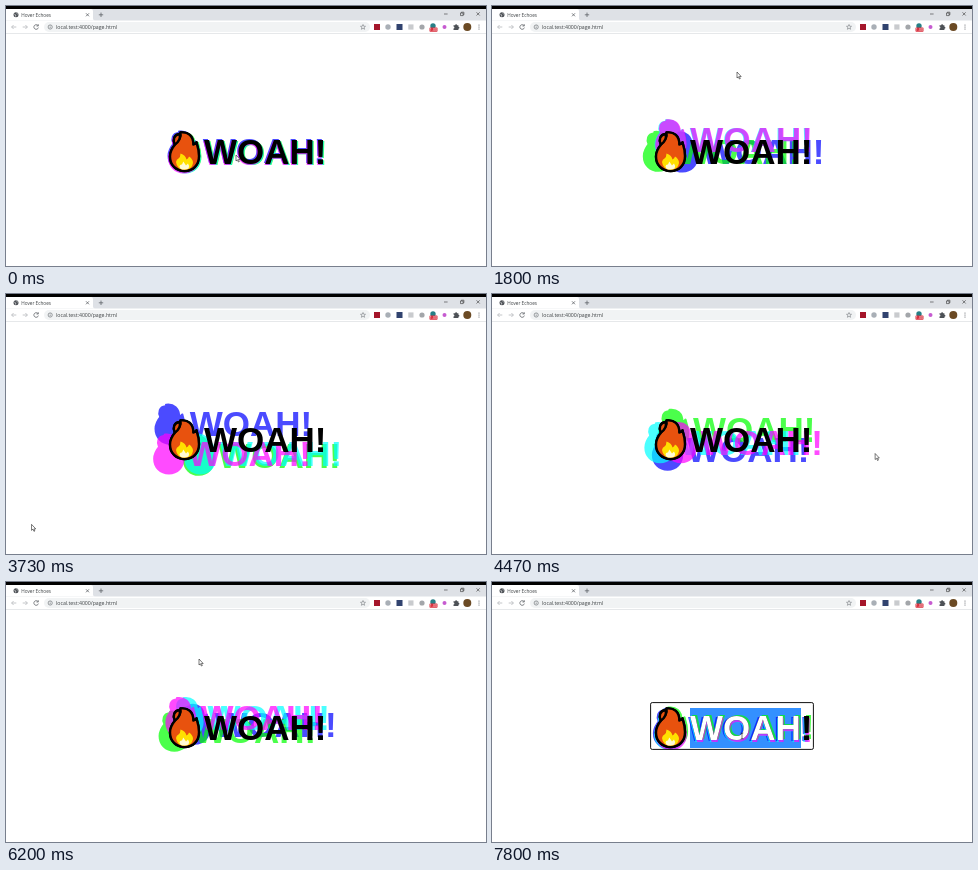
An HTML page for the animation above (8000 ms loop, 480 by 260 pixels).

```html
<!DOCTYPE html>
<html lang="en">
<head>
<meta charset="utf-8">
<title>Hover Echoes</title>
<style>
html, body { margin: 0; width: 100%; height: 100%; overflow: hidden; background: #fff; }
svg { display: block; width: 100vw; height: 100vh; }
.ui { font-family: "Open Sans", "Noto Sans", sans-serif; fill: #3c4043; }
.word { font: bold 35px "Liberation Sans", Arial, sans-serif; }
.line { fill: none; stroke: #5f6368; stroke-width: .8; }
</style>
</head>
<body>
<svg viewBox="0 0 480 260">
  <defs>
    <path id="body" d="M174.5 126.5C182 125.5 187.5 130 187.3 138.5Q189.5 138 190.5 136.3C192 141 193 146 193 150C193 159 187 165 178.6 165C170 165 164 159 164 150.5C164 145 166.5 141.5 169.5 138C173 134 175.5 131 174.5 126.5Z"/>
    <path id="drop" d="M168.8 138.5C166.5 134 168 128.5 173.6 128C174.6 132 173.5 135.5 168.8 138.5Z"/>
    <g id="shape">
      <g stroke-width="2.4" stroke-linejoin="round"><use href="#body"/><use href="#drop"/></g>
      <text class="word" x="198" y="158" stroke="none">WOAH!</text>
    </g>
    <clipPath id="picked"><rect x="198" y="126" width="111" height="40"/></clipPath>
  </defs>

  <rect width="480" height="260" fill="#fff"/>
  <rect width="480" height="3" fill="#000"/>
  <rect y="3" width="480" height="11.5" fill="#dee1e6"/>
  <path d="M0 14.5V3H85Q87 3 87 5V12.5Q87 14.5 89 14.5Z" fill="#fff"/>
  <circle cx="10" cy="8.8" r="2.5" fill="#4d5156"/>
  <path d="M8.3 8.2L9.8 9L9.5 10.5M10.4 7L11.8 8.2" class="line" style="stroke:#fff;stroke-width:.6"/>
  <text class="ui" x="15.3" y="10.6" font-size="4.7">Hover Echoes</text>
  <g class="line">
    <path d="M80 7.3l3 3m0-3l-3 3M92.8 8.8h4.4m-2.2-2.2v4.4"/>
    <path d="M438 8h3.6M454.5 7h2.6v2.6h-2.6zM455.3 7v-.8h2.6v2.6h-.8M470.5 6.3l3.2 3.2m0-3.2l-3.2 3.2" stroke="#333" stroke-width=".6"/>
    <path d="M10.3 21H5.6m2-2l-2 2l2 2M16.7 21h4.7m-2-2l2 2l-2 2" stroke="#b5b8bc"/>
    <path d="M32 19.6a2.3 2.3 0 1 0 .4 2M32.3 18.3v1.7h-1.8"/>
  </g>
  <rect x="38" y="16" width="326" height="10" rx="5" fill="#f1f3f4"/>
  <circle cx="44.2" cy="21" r="2.1" class="line" style="stroke-width:.6"/>
  <path d="M44.2 20.7v1.4M44.2 19.6v.6" class="line" style="stroke-width:.6"/>
  <text class="ui" x="50" y="22.9" font-size="5.2">local.test:4000/page.html</text>
  <path d="M357 18.5l.7 1.7 1.8.1-1.4 1.2.5 1.8-1.6-1-1.6 1 .5-1.8-1.4-1.2 1.8-.1z" class="line" style="stroke-width:.5"/>
  <rect x="368" y="18" width="6" height="6" fill="#a5162b"/>
  <circle cx="382" cy="21" r="2.7" fill="#a9afb6"/>
  <rect x="390.5" y="18" width="6" height="6" fill="#31436f"/>
  <rect x="402.3" y="18.4" width="5.2" height="5.2" fill="#c9cbce"/>
  <circle cx="416" cy="21" r="2.6" fill="#a3a6aa"/>
  <circle cx="427" cy="20" r="2.7" fill="#267f86"/>
  <rect x="423.5" y="21.6" width="8" height="4.2" rx=".8" fill="#d9303e"/>
  <text class="ui" x="427.5" y="25" font-size="3.7" text-anchor="middle" style="fill:#fff">1.00</text>
  <circle cx="438.5" cy="21" r="2" fill="#c65bd0"/>
  <path d="M447.5 19.2h1.6a1 1 0 0 1 2 0h1.3v1.5a1 1 0 0 1 0 2v1.2h-4.9v-1.5a.9.9 0 0 0 0-1.8z" fill="#4d5156"/>
  <circle cx="461.3" cy="21" r="4" fill="#6b4a24"/>
  <g fill="#5f6368"><circle cx="473" cy="19" r=".6"/><circle cx="473" cy="21" r=".6"/><circle cx="473" cy="23" r=".6"/></g>
  <path d="M0 27.5H480" stroke="#dcdee1" stroke-width=".7"/>

  <rect id="mark" x="198" y="126" width="111" height="40" fill="#3390ff"/>
  <g id="shadows"></g>
  <use href="#shape" fill="#000" stroke="#000"/>
  <g stroke="#000" stroke-width="2.4" stroke-linejoin="round" fill="#e8520e"><use href="#body"/><use href="#drop"/></g>
  <path d="M170 156Q170.5 153 172.5 152.5Q174.5 151 174.5 147.5Q179.5 149 180.5 153.5Q182.5 152.5 183 150.5Q187 153 187 157Q186 163.6 178.5 163.7Q171 163.6 170 156Z" fill="#ffe000"/>
  <path d="M173.5 160.5Q174 158 176 158.5L177.3 155.5L180 159.5L182 157.5Q184 160 182.5 162.5Q178.5 164.5 174.5 162.7Z" fill="#fffbd5"/>
  <text id="white" class="word" x="198" y="158" fill="#fff" clip-path="url(#picked)">WOAH!</text>
  <rect id="ring" x="158.6" y="120.6" width="162.8" height="46.8" rx="1.6" fill="none" stroke="#111" stroke-width="1"/>
  <path id="arrow" d="M0 0V6L1.4 4.8L2.4 7L3.3 6.6L2.4 4.5H4.2Z" fill="#fff" stroke="#222" stroke-width=".6"/>
  <path id="beam" d="M-1.3 -3Q0 -3 0 -2V2Q0 3 -1.3 3M1.3 -3Q0 -3 0 -2M0 2Q0 3 1.3 3" fill="none" stroke="#222" stroke-width=".6"/>
</svg>
<script>
const LOOP = 8000, STEP = 200 / 3;
const RING_AT = 7066, PICK_AT = 7266, BEAM_AT = 6930;
const $ = id => document.getElementById(id);

// Pointer path: time, x, y
const path = [
  [0, 230, 149], [700, 230, 149], [733, 234, 150], [867, 235, 147],
  [1667, 246, 73], [1800, 245, 66], [2150, 244, 47], [2400, 238, 47],
  [2700, 190, 75], [3000, 120, 138], [3267, 28, 174], [3550, 1, 205],
  [3850, 50, 241], [4133, 122, 228], [4470, 385, 159], [4700, 437, 142],
  [5000, 343, 190], [5200, 190, 223], [5330, 113, 208], [5600, 89, 150],
  [5870, 128, 98], [6200, 193, 77], [6350, 270, 70], [6550, 374, 120],
  [6733, 300, 186], [6930, 250, 153], [7000, 250, 153], [8000, 250, 153]
];

const slope = (i, k) => {
  const a = path[Math.max(i - 1, 0)], b = path[Math.min(i + 1, path.length - 1)];
  return path[i][k] === a[k] || path[i][k] === b[k] ? 0 : (b[k] - a[k]) / (b[0] - a[0]);
};

function pointer(t) {
  let i = 0;
  while (i < path.length - 2 && path[i + 1][0] <= t) i++;
  const a = path[i], b = path[i + 1], d = b[0] - a[0], u = (t - a[0]) / d;
  return [1, 2].map(k =>
    a[k] + (b[k] - a[k]) * u * u * (3 - 2 * u) +
    d * u * (1 - u) * (slope(i, k) * (1 - u) - slope(i + 1, k) * u));
}

// Bottom to top, each turned from the pointer offset
const layers = [
  ["#00f", (x, y) => [-y, x]],
  ["#0f0", (x, y) => [y, -x]],
  ["#0ff", (x, y) => [-x, y]],
  ["#f0f", (x, y) => [x, y]]
].map(([color, turn]) => {
  const el = document.createElementNS("http://www.w3.org/2000/svg", "use");
  el.setAttribute("href", "#shape");
  el.setAttribute("fill", color);
  el.setAttribute("stroke", color);
  el.setAttribute("opacity", .7);
  $("shadows").append(el);
  return { el, turn };
});

const move = (el, x, y) => el.setAttribute("transform", `translate(${x.toFixed(2)} ${y.toFixed(2)})`);
const show = (id, on) => $(id).setAttribute("visibility", on ? "visible" : "hidden");

function draw(time) {
  const t = Math.floor((time % LOOP + 4) / STEP) * STEP;
  const [mx, my] = pointer(Math.min(t, LOOP));
  const x = (mx - 240) * .073, y = (my - 141) * .16;
  for (const { el, turn } of layers) move(el, ...turn(x, y));
  move($("arrow"), mx, my);
  move($("beam"), mx, my + 1);
  show("arrow", t < BEAM_AT);
  show("beam", t >= BEAM_AT);
  show("ring", t >= RING_AT);
  show("mark", t >= PICK_AT);
  show("white", t >= PICK_AT);
}

const start = performance.now();
function tick() {
  draw(performance.now() - start);
  requestAnimationFrame(tick);
}
tick();
</script>
</body>
</html>
```
